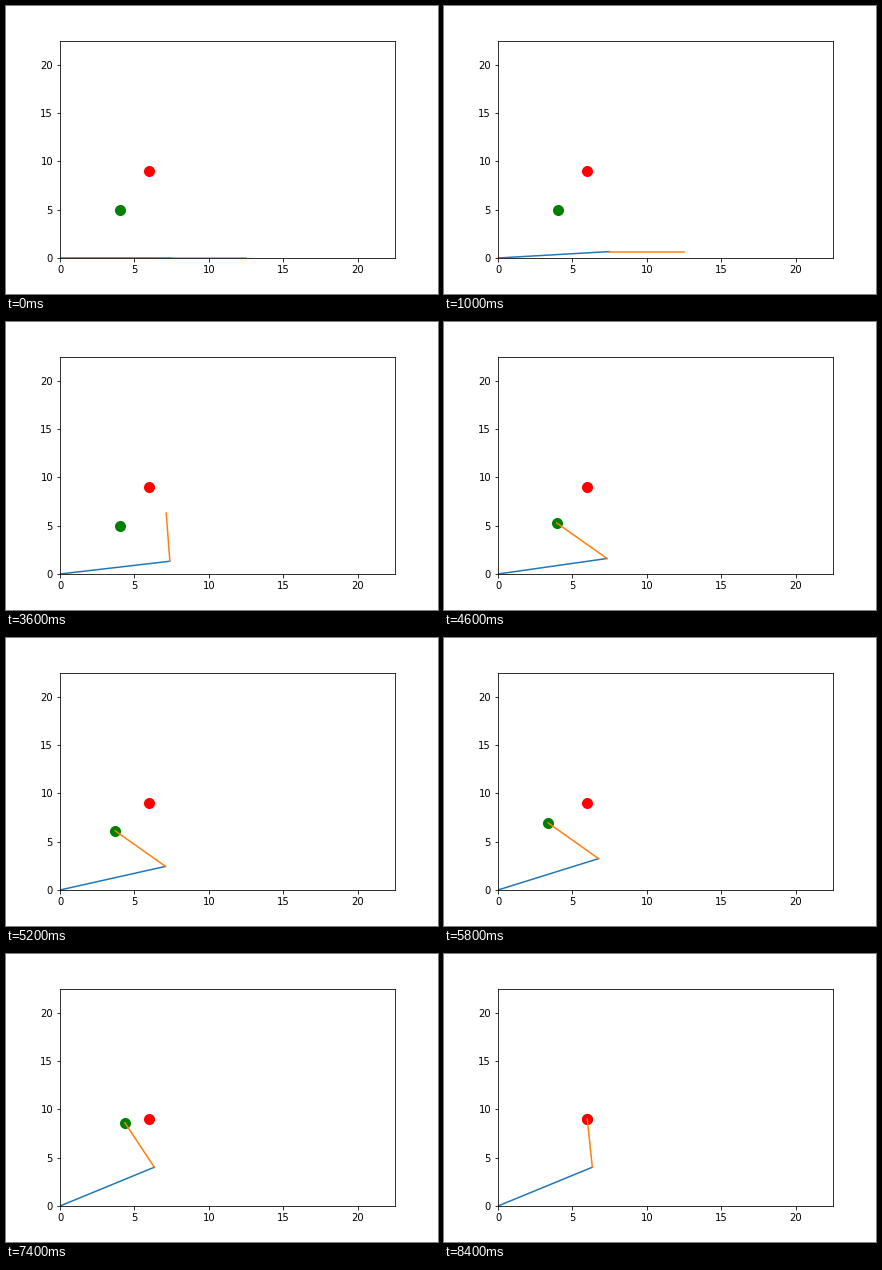
A matplotlib script that plays this animation: 432x288 px, repeating every 9800 ms.

```python
import numpy as np
import matplotlib.pyplot as plt
from matplotlib.animation import FuncAnimation

L1, L2 = 7.5, 5.0
PICK, PLACE = (4, 5), (6, 9)
STEPS, FRAMES, INTERVAL = 10, 49, 200
LIMIT = 1.8 * (L1 + L2)

plt.rcParams.update({"font.family": "DejaVu Sans", "font.size": 10})


def solve(x, y):
    """Absolute angles of both links that put the tip at (x, y)."""
    bend = np.arccos((x * x + y * y - L1**2 - L2**2) / (2 * L1 * L2))
    base = np.arctan2(y, x) - np.arctan2(L2 * np.sin(bend), L1 + L2 * np.cos(bend))
    return base, base + bend


def ramp(frame, start):
    return np.clip((frame - start) / STEPS, 0, 1)


pick_angles, place_angles = solve(*PICK), solve(*PLACE)


def link_angle(frame, link, pick_start, place_start):
    a, b = pick_angles[link], place_angles[link]
    return a * ramp(frame, pick_start) + (b - a) * ramp(frame, place_start)


fig = plt.figure(figsize=(6, 4), dpi=72, facecolor="white")
ax = fig.add_axes([0.125, 0.125, 0.775, 0.755])
ax.set(xlim=(0, LIMIT), ylim=(0, LIMIT))
ax.set_xticks(range(0, 21, 5))
ax.set_yticks(range(0, 21, 5))

ball, = ax.plot(*PICK, "o", color="green", ms=10)
ax.plot(*PLACE, "o", color="red", ms=10)
upper, = ax.plot([], [], color="C0", lw=1.5)
fore, = ax.plot([], [], color="C1", lw=1.5)


def update(frame):
    q1 = link_angle(frame, 0, 0, 22)
    q2 = link_angle(frame, 1, 11, 32)
    ex, ey = L1 * np.cos(q1), L1 * np.sin(q1)
    tx, ty = ex + L2 * np.cos(q2), ey + L2 * np.sin(q2)
    upper.set_data([0, ex], [0, ey])
    fore.set_data([ex, tx], [ey, ty])
    # The ball is carried once the tip has reached it.
    bx, by = (tx, ty) if frame > 21 else PICK
    ball.set_data([bx], [by])
    return ball, upper, fore


anim = FuncAnimation(fig, update, frames=FRAMES, interval=INTERVAL,
                     init_func=lambda: update(0), repeat=True, repeat_delay=0)
plt.show()
```
